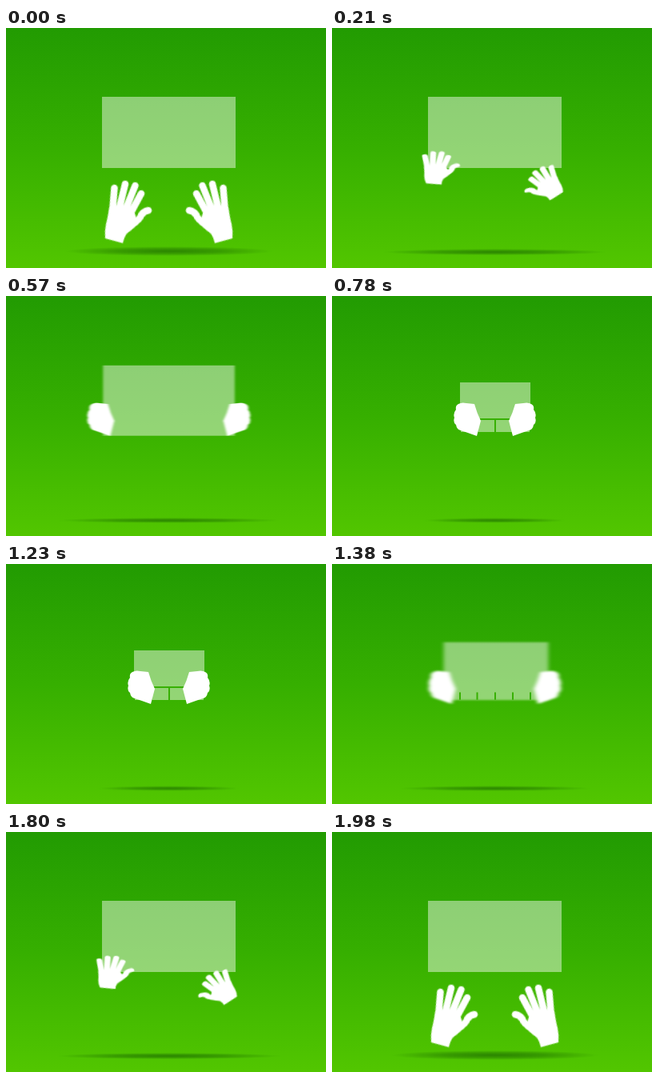
Recreate the animation shown at these times as an HTML page without scripts. Size 400 by 300 pixels, loop 2.13 s.

```html
<!DOCTYPE html>
<html lang="en">
<head>
<meta charset="utf-8">
<title>Hands squeezing a panel</title>
<style>
  html, body { margin: 0; width: 100%; height: 100%; overflow: hidden; background: #36ae00; }
  svg { display: block; width: 100%; height: 100%; }

  /* Poses: wrist position, finger direction, foreshortening */
  :root {
    --rest: translate(136px, 266px) rotate(14deg) scale(1, 1);
    --lift: translate(127px, 211px) rotate(32deg) scale(.85, .54);
    --turn: translate(128px, 195px) rotate(4deg) scale(.85, .53);
    --swing: translate(139px, 185px) rotate(-52deg) scale(.82, .86);
    --reach: translate(131px, 152px) rotate(-74deg) scale(.78, .79);
    --grab: translate(130px, 162px) rotate(-68deg) scale(.74, .44);
  }

  /* One pass goes from rest to squeezed; the way back is its mirror */
  .fly, .fist, .slide, .panel, .tick, .seam, .shadow {
    animation: 1065ms linear -60ms infinite alternate;
  }
  .left .fly { animation-name: fly-left, blur, open; }
  .right .fly { animation-name: fly-right, blur, open; }
  .fly { animation-timing-function: linear, step-end, step-end; }
  .fist { animation-name: fist; animation-timing-function: step-end; }
  .slide { animation-name: slide, smear; animation-timing-function: linear, step-end; }
  .panel { animation-name: panel, smear; animation-timing-function: linear, step-end; }
  .tick { animation-name: tick; }
  .seam { animation-name: seam; }
  .shadow { animation-name: shadow; }

  @keyframes fly-left {
    0%, 8.45% { transform: var(--rest); }
    20.66% { transform: var(--lift); }
    25.35% { transform: var(--turn); }
    34.74% { transform: var(--swing); }
    39.44% { transform: var(--reach); }
    51.2%, 100% { transform: var(--grab); }
  }
  @keyframes fly-right {
    0%, 12.2% { transform: var(--rest); }
    25.35% { transform: var(--lift); }
    30.05% { transform: var(--turn); }
    39.44% { transform: var(--swing); }
    44.13% { transform: var(--reach); }
    54%, 100% { transform: var(--grab); }
  }
  @keyframes blur {
    0% { filter: none; }
    10%, 100% { filter: blur(.9px); }
  }
  @keyframes open {
    0% { opacity: 1; }
    54%, 100% { opacity: 0; }
  }
  @keyframes fist {
    0% { opacity: 0; }
    54%, 100% { opacity: 1; }
  }
  @keyframes slide {
    0%, 57.7% { transform: translateX(0); animation-timing-function: cubic-bezier(.4, 0, .8, .7); }
    64.8% { transform: translateX(21px); animation-timing-function: cubic-bezier(.2, .6, .4, 1); }
    78.9%, 100% { transform: translateX(52px); }
  }
  @keyframes panel {
    0%, 57.7% {
      x: 120px; y: 86px; width: 167px; height: 89px;
      animation-timing-function: cubic-bezier(.4, 0, .8, .7);
    }
    64.8% {
      x: 140px; y: 98px; width: 130px; height: 72px;
      animation-timing-function: cubic-bezier(.2, .6, .4, 1);
    }
    78.9%, 100% { x: 160px; y: 108px; width: 88px; height: 62px; }
  }
  @keyframes smear {
    0% { filter: none; }
    58% { filter: url(#soft); }
    61.5% { filter: url(#fast); }
    70% { filter: url(#soft); }
    77%, 100% { filter: none; }
  }
  @keyframes tick {
    0%, 59.2% { transform: translateY(170px) scaleY(0); }
    64.8% { transform: translateY(170px) scaleY(.65); }
    72%, 100% { transform: translateY(170px) scaleY(1); }
  }
  @keyframes seam {
    0%, 70% { opacity: 0; }
    76%, 100% { opacity: 1; }
  }
  @keyframes shadow {
    0%, 8.45% { transform: translate(203.5px, 279px) scale(128, 6); }
    25.35% { transform: translate(203.5px, 280px) scale(138, 4); }
    39.44% { transform: translate(203.5px, 280.5px) scale(168, 3.5); }
    57.7% { transform: translate(203.5px, 280.5px) scale(142, 3.3); }
    64.8% {
      transform: translate(203.5px, 280.5px) scale(117, 3.2);
      animation-timing-function: cubic-bezier(.2, .6, .4, 1);
    }
    78.9%, 100% { transform: translate(203.5px, 280.5px) scale(87, 3); }
  }
</style>
</head>
<body>
<svg viewBox="0 0 400 300" preserveAspectRatio="none">
  <defs>
    <linearGradient id="bg" gradientUnits="userSpaceOnUse" x1="0" y1="0" x2="0" y2="300">
      <stop offset="0" stop-color="#229b02"/>
      <stop offset=".5" stop-color="#36af00"/>
      <stop offset="1" stop-color="#52c600"/>
    </linearGradient>
    <radialGradient id="shade">
      <stop offset="0" stop-color="#145c00" stop-opacity=".6"/>
      <stop offset=".5" stop-color="#145c00" stop-opacity=".38"/>
      <stop offset="1" stop-color="#145c00" stop-opacity="0"/>
    </radialGradient>
    <filter id="soft"><feGaussianBlur stdDeviation="1.5 .7"/></filter>
    <filter id="fast"><feGaussianBlur stdDeviation="2.8 .8"/></filter>

    <!-- Wrist at the origin, fingers up -->
    <g id="open" transform="rotate(-14) translate(-136 -266)" fill="#fff">
      <path d="M129 224 Q127 238 125 245 Q123 254 124 263 L146 269 Q148 261 151 257 Q158 252 165 245 L160 228 Z"/>
      <path fill="none" stroke="#fff" stroke-width="8.5" stroke-linecap="round"
        d="M133 230 L135.5 200 M141 228 L149 195 M149 228 L161.5 197 M155 233 L169 207 M156 247 Q168 239 169 234 Q172 229 178 228"/>
    </g>
    <path id="fist" fill="#fff" d="M106 135 Q110 132.500 116 134 L126 135 Q129 146 134 156 L129 175 Q118 171 109 168 Q104 167 103 161 Q99 158 101 152 Q99 147 103 142 Q102 137 106 135 Z"/>
    <g id="gap" fill="url(#bg)"><rect x="-1" y="-15" width="2" height="15"/></g>
  </defs>

  <rect width="400" height="300" fill="url(#bg)"/>
  <circle class="shadow" r="1" fill="url(#shade)"/>
  <rect class="panel" x="120" y="86" width="167" height="89" fill="#fff" fill-opacity=".46"/>

  <g fill="#37b000">
    <g class="tick">
      <path d="M159 0 v-15 h2 v15 Z M180.500 0 v-15 h2 v15 Z M203 0 v-15 h2 v15 Z M225 0 v-15 h2 v15 Z M247 0 v-15 h2 v15 Z"/>
    </g>
    <rect class="seam" x="160" y="153" width="88" height="2"/>
  </g>

  <g class="left">
    <g class="slide">
      <g class="fly"><use href="#open"/></g>
      <use class="fist" href="#fist"/>
    </g>
  </g>
  <g class="right" transform="translate(407 0) scale(-1 1)">
    <g class="slide">
      <g class="fly"><use href="#open"/></g>
      <use class="fist" href="#fist"/>
    </g>
  </g>
</svg>
</body>
</html>
```
